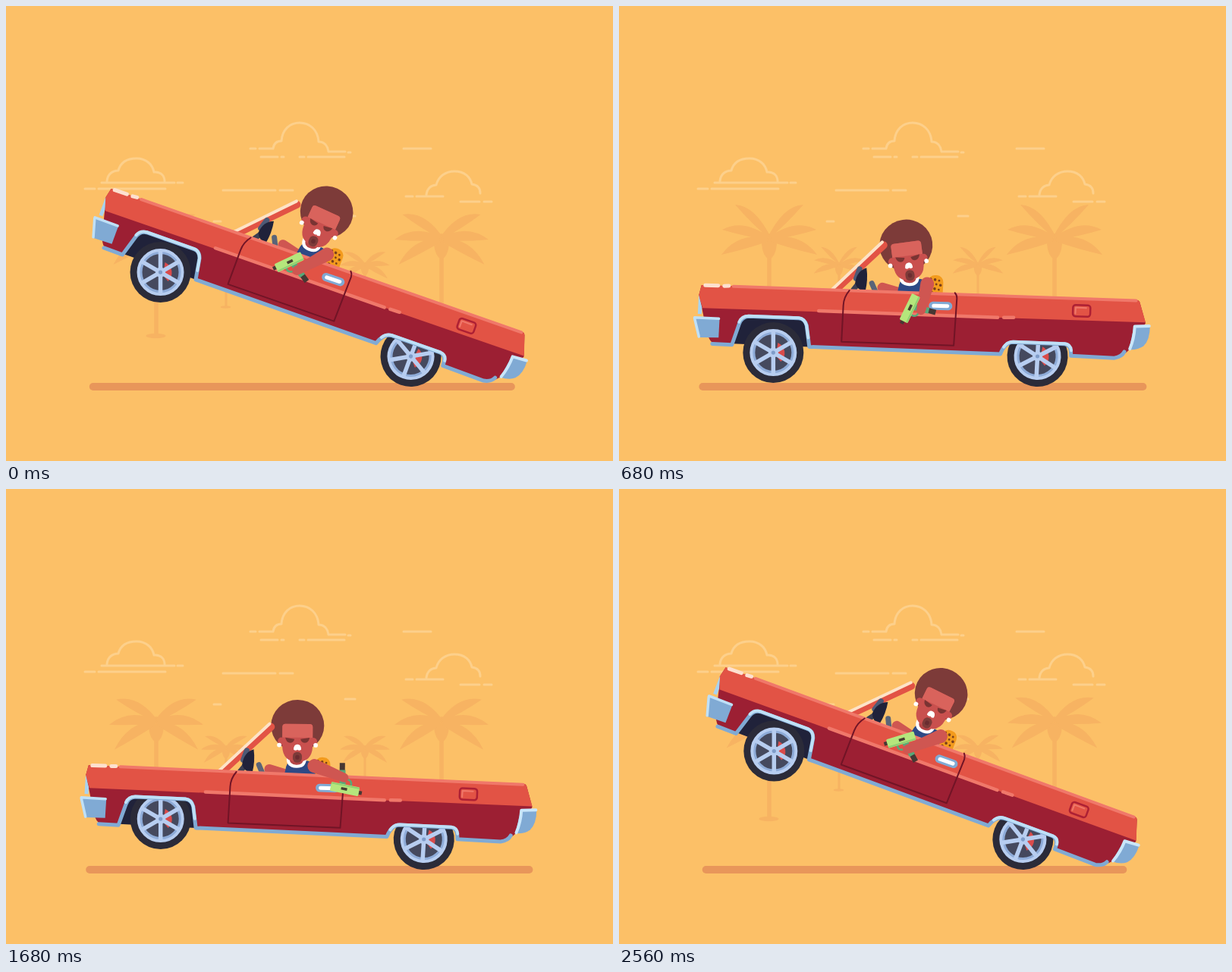
Recreate the animation shown at these times as an HTML page. Size 800x600 px, loop 2600 ms.

```html
<!DOCTYPE html>
<html lang="en">
<head>
<meta charset="utf-8">
<title>Lowrider</title>
<style>
html, body { margin: 0; width: 100%; height: 100%; overflow: hidden; background: #fcc067; }
svg { display: block; width: 100vw; height: 100vh; }
</style>
</head>
<body>
<svg viewBox="0 0 800 600" fill="none" stroke-linecap="round" stroke-linejoin="round">
  <defs>
    <g id="wheel">
      <circle r="40" fill="#2b2b39"/>
      <circle r="26" fill="#45495e" stroke="#8eabd8" stroke-width="4"/>
      <circle r="29" stroke="#b7cdf0" stroke-width="4"/>
      <path d="M6-13A15 15 0 0 1 10 12L5 6V-6Z" fill="#d94b4b"/>
      <path id="spokes" stroke="#b7cdf0" stroke-width="5.500"/>
      <circle r="6.500" fill="#b7cdf0"/>
      <circle r="2.600" fill="#7f9cc9"/>
    </g>
  </defs>
  <rect width="800" height="600" fill="#fcc067"/>
  <g stroke="#fdd08b" stroke-width="3">
    <path d="M133 231C134 221 141 217 148 217C151 206 160 201 172 201C185 201 193 209 195 219C204 218 209 224 209 231M126 233H222M226 233H233M104 241H117M122 241H210"/>
    <path d="M334 188H352C353 181 357 178 363 178C364 163 374 154 387 154C400 154 411 163 412 179C420 179 424 185 425 192H447M451 193H454M322 188H329M336 199H358M363 199H366M387 199H393M398 199H446"/>
    <path d="M554 249C555 240 561 236 567 236C570 224 580 218 591 218C605 218 612 226 614 235C622 236 625 241 625 247M527 251H536M541 251H576M599 258H624M630 258H640"/>
    <path d="M524 188H560M286 243H355M361 243H378M274 284H283M447 277H460"/>
  </g>
  <g id="palms" fill="#f7b362"></g>
  <line id="ground" y1="502" y2="502" stroke="#e8965a" stroke-width="10"/>
  <g id="car">
    <path d="M149 466L157 430H242L250 465Z" fill="#20223a"/>
    <use id="front" href="#wheel"/>
    <use href="#wheel" transform="translate(551 462)"/>

    <g id="seat">
      <rect x="402" y="362" width="20" height="34" rx="9" fill="#f39b1d"/>
    </g>
    <path d="M342 382L368 388" stroke="#cf5651" stroke-width="13"/>
    <path d="M361 396L364 377Q366 368 376 368H392Q402 369 403 378V396Z" fill="#2e4985"/>
    <path d="M366 366Q366 376 377 376Q388 376 388 366" fill="#b54546" stroke="#fff" stroke-width="4"/>
    <g id="head">
      <ellipse cy="-41.500" rx="35" ry="34" fill="#7d3b39"/>
      <g id="face">
        <g fill="#c9504e">
          <circle cx="-21" cy="-20" r="5"/>
          <circle cx="21" cy="-20" r="5"/>
          <path d="M-20-39Q-20-43-16-43H16Q20-43 20-39V-13Q19 7 0 7Q-19 7-20-13Z"/>
        </g>
        <path d="M-20-39Q-20-43-16-43H16Q20-43 20-39V-25H-20Z" fill="#d9635c"/>
        <path d="M-16-25L-4-23Q-5-18-10-18Q-15-19-16-25ZM16-25L4-23Q5-18 10-18Q15-19 16-25Z" fill="#7a3433"/>
        <rect x="-6" y="-6" width="12" height="14" rx="5.500" fill="#7d3b39"/>
        <ellipse cy="1" rx="2.800" ry="3" fill="#6a2c30"/>
        <path d="M-5-9Q-5-16 0-16Q5-16 5-9Q2-7 0-9Q-2-7-5-9Z" fill="#fff"/>
        <g fill="#fff">
          <circle cx="-24" cy="-15" r="2.900"/>
          <circle cx="24" cy="-15" r="2.900"/>
        </g>
      </g>
    </g>
    <path d="M281 388L341 326" stroke="#e25345" stroke-width="10"/>
    <path d="M276 388L339 322" stroke="#fde3c8" stroke-width="4"/>
    <path d="M328 377L333 387" stroke="#5a6478" stroke-width="7"/>
    <path d="M304 387L309 380" stroke="#3b3f52" stroke-width="7"/>
    <path d="M307 372L311 359" stroke="#4d5a76" stroke-width="7"/>
    <path d="M320 357Q323 372 320 388Q310 388 306 378Q307 362 320 357Z" fill="#20223a"/>

    <path d="M104 391L678 381Q681 381 682 384L691 411L676 440Q666 457 652 458L597 459Q596 446 586 445L520 446Q508 447 504 458L500 462L251 466L244 436Q242 429 234 429L168 431Q160 431 157 440L149 467L126 468Q118 466 114 452L106 421L101 405Z" fill="#9c1f33"/>
    <path d="M104 391L678 381Q681 381 682 384L691 410L107 421L101 405Z" fill="#e25345"/>
    <path d="M146 390.500L677 382" stroke="#f0786a" stroke-width="4"/>
    <path d="M260 417L496 413.500M504 413L517 412.500" stroke="#f0786a" stroke-width="4.500"/>
    <path d="M109 391L126 390.500M134 390.500L140 390" stroke="#fde0cf" stroke-width="5"/>
    <path d="M101 404L106 420V429H101Z" fill="#a9d3ef"/>

    <path d="M122 467.500L148 467.500L156 440Q159 430 168 429L234 428Q242 428 245 437L250 465L502 461.500Q507 446 518 445L586 444Q595 445 595 459L652 459Q662 457 665 450" stroke="#80aad4" stroke-width="5"/>
    <path d="M156 437Q159 429 168 428.500L234 427.500Q242 428 245 437L248 453M506 452Q510 445 518 444.500L586 443.500Q594 444 595 452" stroke="#bfe0f7" stroke-width="4"/>
    <path d="M97 434H130V459L104 460Z" fill="#80aad4"/>
    <path d="M97 434H129M97 435L104 459" stroke="#bfe0f7" stroke-width="3.500"/>
    <path d="M676 416L697 414Q698 433 690 441Q683 447 671 447Z" fill="#80aad4"/>
    <path d="M672 446Q677 432 677 416L696 414.500" stroke="#c9e6fa" stroke-width="4"/>

    <path d="M299 388Q292 397 292 408V456L440 453.500L441 391Q441 387 438 384" stroke="#711426" stroke-width="2"/>
    <rect x="594.500" y="391.500" width="23" height="15" rx="3.500" fill="#e25345" stroke="#ad2034" stroke-width="2.500" transform="rotate(-1 606 399)"/>
    <path d="M598 403V395H612" stroke="#f0786a" stroke-width="2"/>
    <path d="M410 402.500L430 402" stroke="#80aad4" stroke-width="11"/>
    <path d="M411 402.500L429 402" stroke="#fff" stroke-width="5"/>
    <path id="glint" d="M0-6L1.500-1.500L6 0L1.500 1.500L0 6L-1.500 1.500L-6 0L-1.500-1.500Z" fill="#fff"/>

    <g id="grip">
      <path d="M-8-23L-10-33" stroke="#473733" stroke-width="7" stroke-linecap="butt"/>
      <path d="M-3 0L-8-24" stroke="#59a878" stroke-width="8" stroke-linecap="butt"/>
      <path d="M7-6Q8-14-3-13" stroke="#59a878" stroke-width="2.500"/>
    </g>
    <path id="arm" fill="#cf5651"/>
    <g id="gun">
      <path d="M17 1H23" stroke="#473733" stroke-width="5" stroke-linecap="butt"/>
      <rect x="-19" y="-6" width="38" height="12" rx="1.500" fill="#b5e67c"/>
      <path d="M-18-4.500H18" stroke="#8fcf72" stroke-width="2"/>
      <path d="M-5 0H3" stroke="#473f30" stroke-width="3.500" stroke-linecap="butt"/>
    </g>
  </g>
  <path id="sparks" stroke="#fff" stroke-width="2"/>
</svg>
<script>
const LOOP = 2600, STEP = 40, RAD = Math.PI / 180;
const $ = id => document.getElementById(id);
const set = (el, name, value) => el.setAttribute(name, value);
const clamp = (v, lo, hi) => Math.max(lo, Math.min(hi, v));
const wave = (t, peak) => Math.cos((t - peak) / LOOP * 2 * Math.PI);

function add(parent, tag, attrs) {
  const el = document.createElementNS('http://www.w3.org/2000/svg', tag);
  for (const k in attrs) set(el, k, attrs[k]);
  return parent.appendChild(el);
}

// Each hop is a thrown curve: time of peak, rise, fall, height in degrees.
const hops = [
  { peak: 2320, rise: 500, fall: 785, top: 24.3 },
  { peak: 700, rise: 180, fall: 210, top: 4 },
  { peak: 1140, rise: 186, fall: 327, top: 15.5 },
  { peak: 1650, rise: 160, fall: 165, top: 4.6 }
];

function pitch(t) {
  let a = -1;
  for (const h of hops) {
    const d = (t - h.peak + 1.5 * LOOP) % LOOP - LOOP / 2;
    const u = d / (d < 0 ? h.rise : h.fall);
    a += h.top * Math.max(0, 1 - u * u);
  }
  return a;
}

// Key poses: time, gun x, gun y, gun turn, head tilt, front wheel drop
const poses = [
  [400, -136, -36, 55, -10, 17],
  [960, -202, -75, 162, -6, 8],
  [1360, -109, -57, 12, 14, 9],
  [1680, -108, -60, 8, -3, -6],
  [2120, -195, -113, 201, -1, -1],
  [2560, -197, -65, 142, 5, 9]
];

// Smooth curve through the poses, looping
function pose(t) {
  if (t < poses[0][0]) t += LOOP;
  const n = poses.length;
  const at = i => poses[(i + n) % n].map((v, k) => k ? v : v + Math.floor(i / n) * LOOP);
  let i = n - 1;
  while (poses[i][0] > t) i--;
  const [p, a, b, q] = [i - 1, i, i + 1, i + 2].map(at);
  const h = b[0] - a[0], u = (t - a[0]) / h, v = 1 - u;
  return a.slice(1).map((_, j) => {
    const k = j + 1;
    const s1 = (b[k] - p[k]) / (b[0] - p[0]), s2 = (q[k] - a[k]) / (q[0] - a[0]);
    return a[k] * (1 + 2 * u) * v * v + b[k] * u * u * (3 - 2 * u) + h * u * v * (s1 * v - s2 * u);
  });
}

function palm(x, y, foot, s) {
  const g = $('palms'), transform = `translate(${x} ${y}) scale(${s})`;
  add(g, 'path', { d: `M${x - 2.8 * s} ${y}h${5.6 * s}V${foot}h${-5.6 * s}Z` });
  add(g, 'ellipse', { cx: x - .5, cy: foot, rx: 13 * s, ry: 3.2 * s });
  add(g, 'path', { d: 'M-10 10Q-10-2 0-4Q10-2 10 10Q9 25 0 31Q-9 25-10 10Z', transform });
  return add(g, 'path', { transform });
}
const palms = [palm(198, 304, 435, 1), palm(574, 304, 435, 1), palm(290, 340, 397, .53), palm(473, 340, 397, .53)];

// Three leaves a side, fanned from top to bottom
function crown(up) {
  let d = '';
  for (const side of [-1, 1]) for (let i = 0; i < 3; i++) {
    const x = [53, 62, 55][i] + (i - 1) * 7 * up, y = 33 * i - 26 - 14 * up, bend = 6 * (i - .7);
    const sx = v => (side * v).toFixed(2);
    d += `M${sx(-3)} 3Q${sx(x / 2 + bend)} ${y / 2 - 20} ${sx(x)} ${y}Q${sx(x / 2)} ${y / 2 + 5} ${sx(-3)} 5Z`;
  }
  return d;
}

set($('spokes'), 'd', [0, 60, 120].map(a => {
  const x = 27 * Math.sin(a * RAD), y = 27 * Math.cos(a * RAD);
  return `M${x} ${y}L${-x} ${-y}`;
}).join(''));

for (let i = 0; i < 12; i++)
  add($('seat'), 'circle', { cx: 405.5 + i % 3 * 5.5 + (i / 3 & 1) * 2, cy: 367 + (i / 3 | 0) * 6 + i % 3, r: 1.4 + i % 2 * .4, fill: '#7a3f1c' });

function limb(x1, y1, r1, x2, y2, r2) {
  const a = Math.atan2(y2 - y1, x2 - x1), nx = -Math.sin(a), ny = Math.cos(a);
  return `M${x1 + nx * r1} ${y1 + ny * r1}L${x2 + nx * r2} ${y2 + ny * r2}`
    + `A${r2} ${r2} 0 0 0 ${x2 - nx * r2} ${y2 - ny * r2}`
    + `L${x1 - nx * r1} ${y1 - ny * r1}A${r1} ${r1} 0 0 0 ${x1 + nx * r1} ${y1 + ny * r1}Z`;
}

function draw(t) {
  const a = pitch(t), speed = (a - pitch(t - 80)) / 80;
  const [gunX, gunY, turn, tilt, drop] = pose(t);

  // The rear axle is pulled forward as the nose rises.
  const x = 551 - .04 * a * a + 60 * speed;
  set($('car'), 'transform', `translate(${x - 551} 0) rotate(${a} 551 462)`);
  set($('ground'), 'x1', x - 445 + 1.3 * a);
  set($('ground'), 'x2', x + 140 - .38 * a);

  // The front wheel stretches with speed and flattens against the ground.
  const cy = 462 - 348 * Math.sin(a * RAD) + drop * Math.cos(a * RAD);
  const stretch = clamp((Math.abs(speed) - .022) * 450, 0, 7);
  const ry = Math.min(40 + stretch, 499 - cy);
  const rx = 40 - (ry - 40) * (ry > 40 ? 1.3 : .28);
  set($('front'), 'transform', `translate(203 ${462 + drop}) rotate(${-a}) scale(${rx / 40} ${ry / 40})`);

  const nod = clamp(170 * speed, 0, 9);
  set($('head'), 'transform', `translate(378 ${363 + nod}) rotate(${tilt})`);
  set($('face'), 'transform', `translate(0 ${-nod})`);

  const gx = 551 + gunX, gy = 462 + gunY;
  const place = `translate(${gx} ${gy}) rotate(${turn})`;
  set($('gun'), 'transform', place);
  set($('grip'), 'transform', place);
  const hold = (turn - 106) * RAD;
  set($('arm'), 'd', limb(401, 374, 9, gx + 15 * Math.cos(hold), gy + 15 * Math.sin(hold), 6));

  set($('glint'), 'transform', `translate(108 390) scale(${Math.max(0, 4 * wave(t, 960) - 3)})`);

  const burst = (t - 360) / 160, s = burst * 8;
  set($('sparks'), 'd', burst > 0 && burst < 1
    ? `M${190 - s} ${495 - s / 2}l2 2M${187 - s / 2} 496h2M${208 + s} ${495 - s / 2}l-2 2` : '');

  const sway = .5 + .5 * wave(t, 700);
  const d = crown(1.15 * sway * sway);
  palms.forEach(p => set(p, 'd', d));
}

const start = performance.now();
function tick() {
  const t = (performance.now() - start) % LOOP;
  draw(Math.floor(t / STEP) * STEP);
  requestAnimationFrame(tick);
}
tick();
</script>
</body>
</html>
```
